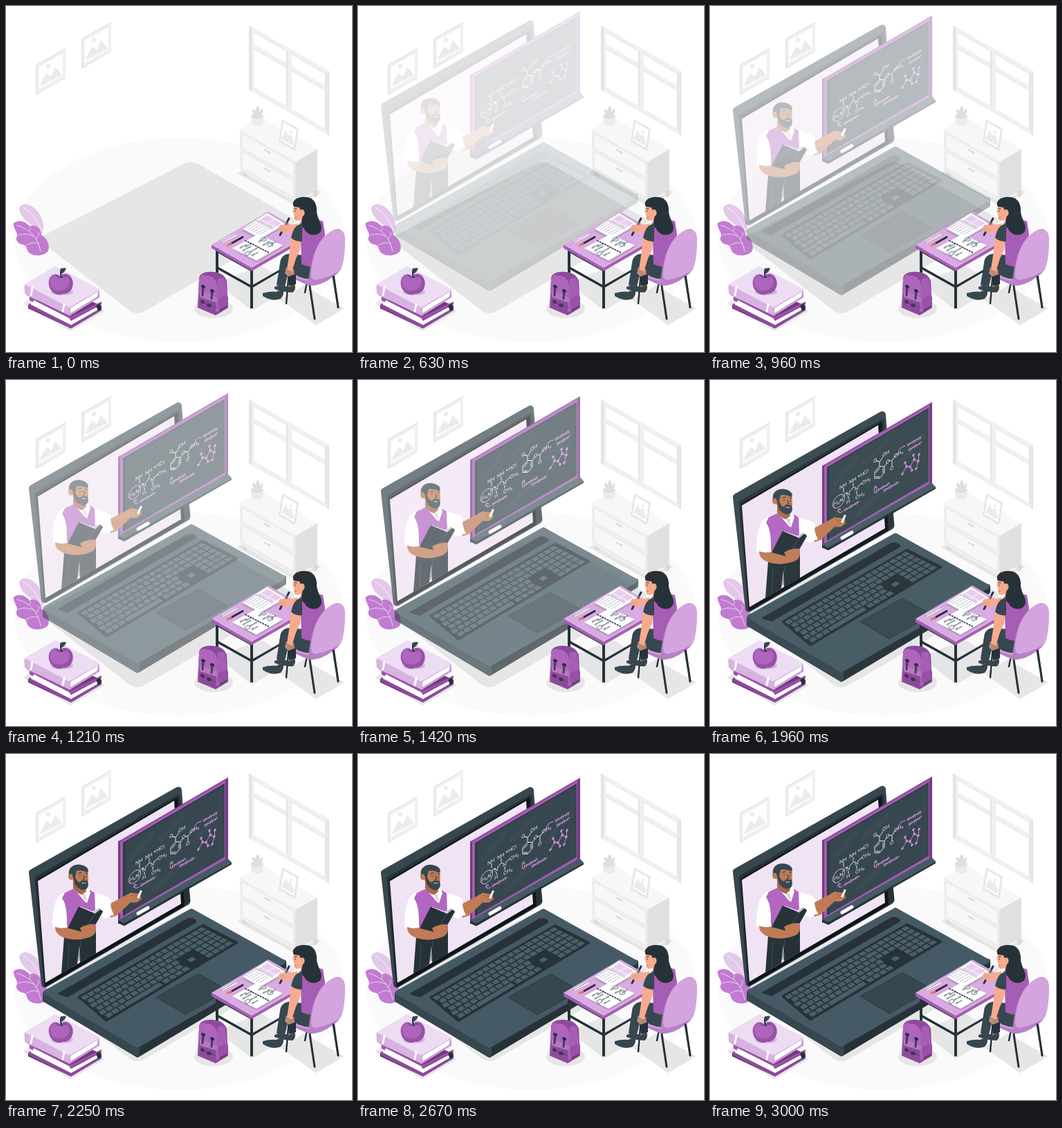
An HTML page for the animation above (3.04 s loop, 500 px wide and 500 px high).

```html
<!DOCTYPE html>
<html lang="en">
<head>
<meta charset="utf-8">
<title>Online lesson</title>
<style>
html, body { margin: 0; width: 100%; height: 100%; overflow: hidden; background: #fff; }
svg { display: block; width: 100vw; height: 100vh; }
text { font: 7px Inter, Arial, sans-serif; fill: #f5f5f5; }
.line { fill: none; stroke-linecap: round; stroke-linejoin: round; }
</style>
</head>
<body>
<svg viewBox="0 0 500 500">
<defs>
  <g id="picture">
    <path fill="#e6e6e6" d="M0 0L43-24V19L0 44Z"/>
    <path fill="#f0f0f0" d="M2 1L43-22V18L2 41Z"/>
    <path fill="#fff" d="M5 3L39-16V15L5 35Z"/>
    <path fill="#ebebeb" d="M7 31V27L15 12L19 14L22 17L28 3L37 13V15Z"/>
    <circle cx="18" cy="2" r="3" fill="#ebebeb"/>
  </g>
</defs>

<!-- Room -->
<ellipse cx="251" cy="338" rx="239" ry="147.500" fill="#fafafa"/>
<use href="#picture" x="43" y="85"/>
<use href="#picture" x="109" y="47"/>
<path fill="#f0f0f0" fill-rule="evenodd" d="M351 28L467 94V187L351 121ZM358 38V55L405 82V65ZM413 70V87L461 115V98ZM358 62V117L405 144V89ZM413 94V149L461 177V122Z"/>
<path fill="#e3e3e3" d="M351 28L355 30V123L351 121ZM405 65L407 66V145L405 144ZM461 98L463 97V179L461 178ZM464 96L467 94V187L464 185Z"/>
<path class="line" stroke="#e6e6e6" d="M358 38L405 65M413 70L461 98M358 62L405 89M413 94L461 122"/>
<path fill="#e6e6e6" d="M334 242L340 238L420 284L451 267L455 270L421 290Z"/>
<path fill="#d8d8d8" d="M341 238L348 242V246H344ZM443 268L450 264V274L446 277Z"/>
<path fill="#f0f0f0" d="M338 178L418 224V283L338 237Z"/>
<path fill="#e0e0e0" d="M418 224L450 207V266L418 283Z"/>
<path fill="#f7f7f7" d="M338 178L368 160L450 207L419 225Z"/>
<path fill="#f7f7f7" stroke="#e3e3e3" d="M341 184L416 227V248L341 205ZM341 210L416 253V277L341 234Z"/>
<path class="line" stroke="#dadada" stroke-width="2.500" d="M374 208L381 212M374 235L381 239"/>
<path fill="#dcdcdc" d="M362 159C355 154 355 150 357 149Q362 151 363 158Q359 148 364 144Q368 150 365 158Q367 149 371 149Q373 153 366 160Z"/>
<path fill="#ebebeb" d="M354 159H372L371 170Q363 176 355 170Z"/>
<ellipse cx="363" cy="159" rx="9" ry="4" fill="#dedede"/>
<path fill="#e6e6e6" d="M399 164L423 177L418 210L394 196Z"/>
<path fill="#fff" d="M401 168L420 179L416 205L397 194Z"/>
<path fill="#ebebeb" d="M398 192L404 179L408 188L411 184L416 196L415 202Z"/>
<circle cx="412" cy="182" r="2" fill="#ebebeb"/>

<path fill="#e6e6e6" d="M54 332Q46 337 54 343L178 440Q190 448 202 440L412 318Q422 311 410 304L279 229Q267 222 255 229Z"/>
<path fill="#e6e6e6" d="M24 430L70 405L143 441L93 470ZM305 400L355 440L418 405L368 375ZM396 424L448 461L489 437L430 404Z"/>
<ellipse cx="300" cy="437" rx="28" ry="14" fill="#e6e6e6"/>

<!-- Plant -->
<path fill="#e3c8ea" d="M19 293C22 284 33 285 42 293C53 303 57 320 52 329C43 317 23 313 19 293Z"/>
<path class="line" stroke="#fff" stroke-width=".8" d="M25 291Q42 301 52 326"/>
<path fill="#c17bd0" d="M11 314C18 308 27 311 34 318C43 315 51 321 51 331C59 335 64 345 61 354C55 361 42 363 34 357C29 353 31 348 26 345C19 345 12 338 16 333C18 328 10 321 11 314Z"/>
<path class="line" stroke="#ead5ef" stroke-width="1" d="M16 317Q45 325 50 355M34 325Q37 321 34 318M43 336Q49 333 47 327M18 331Q30 327 41 333M29 346Q38 340 47 343"/>

<!-- Sliding laptop, teacher and board -->
<g id="lesson">
  <path fill="#37474f" stroke="#37474f" stroke-width="10" stroke-linejoin="round" d="M38 170L249 51L261 212L56 331Z"/>
  <path fill="#263238" stroke="#263238" stroke-width="5" stroke-linejoin="round" d="M44 178L249 60L264 211L57 333Z"/>
  <path fill="#0e1417" d="M45 180L248 61L258 218L56 335Z"/>
  <path fill="#f0e3f4" d="M46 182L243 66L253 215L57 329Z"/>

  <path fill="#263238" stroke="#263238" stroke-width="6" stroke-linejoin="round" d="M56 345L190 422L402 299V307L190 434L56 354Z"/>
  <path fill="#37474f" stroke="#37474f" stroke-width="6" stroke-linejoin="round" d="M56 345L190 422V433L56 354Z"/>
  <path fill="#455a64" stroke="#455a64" stroke-width="6" stroke-linejoin="round" d="M57 343L268 225L401 299L190 420Z"/>
  <path fill="#263238" d="M74 345L262 236Q270 234 275 239V242L89 350Z"/>
  <path fill="#263238" stroke="#263238" stroke-width="3" stroke-linejoin="round" d="M105 350L285 246L334 271L145 384Z"/>
  <g id="keys" fill="#4a5f69"></g>
  <path fill="#37474f" stroke="#2c3a41" d="M217 350L278 316L321 340L259 375Z"/>

  <!-- Teacher -->
  <path fill="#263238" d="M84 263L130 248V287L107 300L106 276L103 302L80 316Z"/>
  <path class="line" stroke="#455a64" stroke-width=".8" d="M91 272L89 308M108 269L105 297"/>
  <path fill="#fff" d="M86 198C73 202 68 213 67 249L86 252L92 235L126 227L144 236L158 229L151 210Q140 204 126 197L110 191Z"/>
  <path fill="#b266c2" d="M85 199L98 193L115 213L121 195L128 199L130 252Q108 267 87 265L88 240Q88 216 81 207Z"/>
  <path fill="#fff" d="M97 192L103 188L119 193L122 199L117 214Z"/>
  <path fill="#d7d2da" d="M110 202L115 201L117 212L113 208Z"/>
  <path fill="#a96744" d="M97 181L114 187L116 197L110 202Q102 200 97 192Z"/>
  <path fill="#bf7b55" d="M95 166Q104 158 118 164L119 181Q117 193 109 192Q99 190 96 180Z"/>
  <ellipse cx="94" cy="175" rx="4" ry="5.500" fill="#bf7b55"/>
  <path fill="#37474f" d="M91 173C89 161 101 155 113 160Q121 164 118 170Q109 166 102 167L100 176Q102 183 107 184Q109 179 118 182L119 187Q118 196 110 195Q99 191 98 181L96 173Q93 170 91 173Z"/>
  <path class="line" stroke="#263238" stroke-width="1" d="M105 171L109 170M115 171L118 172M107 174V175M116 175V176M112 174L114 179L111 180"/>
  <path class="line" stroke="#f0d1bf" stroke-width="1" d="M110 185L115 185"/>
  <path fill="#bf7b55" d="M71 246Q70 258 82 263Q100 270 118 264Q130 261 130 252L124 246L107 250L86 247Z"/>
  <path fill="#fff" d="M67 245Q67 228 75 220L86 238L89 249Q80 252 67 247Z"/>
  <path fill="#e9e4ed" d="M90 249L107 219L126 226L146 214L128 246L113 255Z"/>
  <path fill="#263238" d="M89 250L105 219L129 229L112 256ZM129 229L147 214L130 244L112 256Z"/>
  <path class="line" stroke="#54666f" stroke-width=".8" d="M129 229L112 256M129 227L144 215"/>
  <path fill="#bf7b55" d="M107 250Q114 245 127 244L130 250Q127 259 113 264Z"/>

  <!-- Blackboard -->
  <g transform="matrix(1 -.582 0 1 162 125)">
    <path fill="#8b4599" d="M0 0H159V119H0Z"/>
    <path fill="#a45bb3" d="M2 2H157V117H2Z"/>
    <path fill="#743b80" d="M0 0H3V119H0ZM155 2H159V119H155Z"/>
    <path fill="#37474f" d="M7 6H154V112H7Z"/>
    <path fill="#2d3b42" d="M7 6H10V112H7ZM10 6H154V8H10Z"/>
    <path class="line" stroke="#445158" stroke-width="9" opacity=".45" d="M20 35L48 18M61 30L94 20M53 100L92 86M112 63L145 43"/>
    <g id="formulas"></g>
    <g class="line" stroke="#f5f5f5" stroke-width=".9">
      <path d="M30 62L34 59L37 60M31 56V50M40 60L45 57L47 58M45 55V51M52 60L57 58M38 66V70M50 65V70"/>
      <path d="M76 53L83 49L90 53V62L83 66L76 62ZM78 55L83 52M88 55V61M83 64L78 61M83 49V42L78 38M84 42L88 38M90 53L94 50M97 49L101 51L106 47M101 52V58"/>
    </g>
    <g class="line" stroke="#ce93d8" stroke-width="1">
      <circle cx="24" cy="65" r="8.500" stroke="#d9a5e3"/>
      <path d="M30 83Q23 84 24 76M22 79L24 76L27 79M79 84Q72 83 78 74M75 76L78 74L79 78M120 41Q111 37 109 48M107 45L109 48L112 46"/>
      <path d="M116 79L122 72L127 75L133 68L139 74M122 72L120 65M133 68L132 61M127 75L130 82M139 74L140 65M139 74L136 83"/>
      <g id="notes"></g>
    </g>
    <g id="atoms" fill="#ce93d8"></g>
  </g>
  <path fill="#455a64" d="M162 239L320 149L326 155L171 244Z"/>
  <path fill="#263238" d="M162 239L171 243L326 155V158L171 247L162 243Z"/>
  <path class="line" stroke="#fff" stroke-width="5" d="M191 229L205 221"/>
  <path class="line" stroke="#d8cfdc" stroke-width="1" d="M190 232L206 223"/>

  <!-- Pointing arm -->
  <path fill="#bf7b55" d="M150 215L171 204L180 199L188 200L194 201L196 208L189 213L180 213L160 232L151 235Z"/>
  <path class="line" stroke="#9d603e" stroke-width=".8" d="M187 203L195 205M186 207L194 208M182 203L188 205"/>
  <path class="line" stroke="#fff" stroke-width="3" d="M191 206L195 197"/>
  <path fill="#fff" d="M130 201Q145 202 152 209Q149 218 156 231Q150 234 143 228L130 218Z"/>
</g>

<!-- Desk -->
<g fill="#263238">
  <path d="M303 350H307V398H303ZM353 379H357V437H353ZM410 350H413V404H410Z"/>
  <path d="M305 376L355 404V408L305 380ZM355 404L411 372V375L355 408ZM305 351L355 380V384L305 356Z"/>
</g>
<path fill="#a65db5" d="M297 345L355 378L430 335V340L355 383L297 350Z"/>
<path fill="#d9abe3" d="M297 345L379 297L437 330L355 378Z"/>
<path fill="#b99ac2" d="M341 325L368 339L406 317V315L376 298Z"/>
<path fill="#fff" d="M342 322L377 299L404 315L368 336Z"/>
<path fill="#e7cfec" d="M363 311L378 302L398 314L384 322Z"/>
<path class="line" stroke="#fff" stroke-width="1" d="M368 308L389 319M374 316L389 308"/>
<path class="line" stroke="#a9a9a9" stroke-width=".7" d="M347 321L363 311M350 323L367 313M353 325L370 315M357 327L374 317M361 329L377 320M365 331L380 322M360 309L386 323"/>
<path fill="#b99ac2" d="M327 352L362 371L400 349V346L362 366Z"/>
<path fill="#fff" d="M327 350L364 330L400 346L362 368Z"/>
<path class="line" stroke="#37474f" stroke-width="1.800" stroke-dasharray="1.500 2.500" d="M346 339L381 357"/>
<g id="homework" class="line" stroke="#455a64" stroke-width=".7"></g>
<path class="line" stroke="#455a64" stroke-width=".8" d="M368 336L373 334L377 338L372 340ZM378 344L384 341L386 346L380 348ZM345 357L350 354L353 358L348 361Z"/>
<path class="line" stroke="#fff" stroke-width="3.500" d="M313 340L332 330"/>
<path class="line" stroke="#777" stroke-width="1" d="M311 341L333 329"/>
<path class="line" stroke="#263238" stroke-width="3" d="M324 344L342 334"/>
<path class="line" stroke="#e47763" stroke-width="3" d="M320 346L325 343"/>

<!-- Student and chair -->
<g class="line" stroke="#263238" stroke-width="2.500">
  <path d="M409 384L405 430M435 399L432 414M473 386L480 436"/>
</g>
<path fill="#b980c6" d="M407 380Q405 387 415 394L437 404Q453 406 473 391L465 375Z"/>
<path fill="#d4a4de" d="M407 379Q413 371 430 369L465 375L445 400L414 391Z"/>
<path fill="#f6ab8e" d="M412 397L418 396L417 408L409 409ZM393 404L402 405L400 414L390 416Z"/>
<path fill="#37474f" d="M388 406Q395 402 409 406L417 402Q420 410 414 414Q403 414 388 409ZM371 415Q381 412 391 413L400 409Q403 417 397 423Q385 428 371 419Z"/>
<path fill="#263238" d="M406 372L419 380L419 402L409 405Z"/>
<path fill="#37474f" d="M448 374L429 360L408 358Q397 360 396 371L391 403Q397 408 403 405L409 382Q426 397 445 394Z"/>
<path fill="#f6ab8e" d="M421 314L407 318L397 316Q391 320 396 324L401 328L421 325Z"/>
<path class="line" stroke="#263238" stroke-width="2.800" d="M409 307L396 331"/>
<path class="line" stroke="#d8d8d8" stroke-width="1" d="M406 312L403 317"/>
<path fill="#f6ab8e" d="M396 317L405 316L408 322L402 328L395 324Z"/>
<path class="line" stroke="#e58f72" stroke-width=".8" d="M397 320L404 321M397 323L403 324"/>
<path fill="#a65db5" d="M425 313Q446 306 458 311L461 330L452 376Q439 379 427 373L426 337L420 329Z"/>
<path fill="#f6ab8e" d="M412 334L427 336L425 352L419 365L413 384L406 380L409 361Z"/>
<path fill="#f6ab8e" d="M405 378L416 380L417 388L408 391L403 386Z" opacity=".7"/>
<path fill="#37474f" d="M428 315Q416 315 412 335Q418 341 428 340Z"/>
<path fill="#f6ab8e" d="M420 286L416 290L414 296L416 300L417 309Q421 312 426 309L427 317L435 316L437 294Z"/>
<path fill="#263238" d="M416 290C412 283 418 276 431 276C445 275 450 287 449 298C451 311 460 318 454 327C447 334 435 331 431 322C424 317 428 309 429 303L424 291Z"/>
<ellipse cx="428" cy="299" rx="3.500" ry="5" fill="#f6ab8e"/>
<path class="line" stroke="#263238" stroke-width="1" d="M417 293H420M418 296V297"/>
<path class="line" stroke="#d06c61" stroke-width="1" d="M417 306L420 305"/>
<path fill="#b980c6" d="M437 404C439 371 447 338 471 325Q482 319 488 328Q491 340 488 362Q486 384 473 391Q455 405 437 404Z"/>
<path fill="#d4a4de" d="M441 384C444 352 455 332 474 324Q490 321 490 337Q490 366 484 381C472 389 459 394 446 396Q440 394 441 384Z"/>
<path class="line" stroke="#263238" stroke-width="3" d="M439 405L446 452M473 391L480 435"/>

<!-- Backpack -->
<path fill="#8d4a9b" d="M279 393Q281 384 296 384Q314 384 319 397L321 436L303 447L277 436Z"/>
<path fill="#ad65bd" d="M279 397C278 384 302 384 305 401L306 442L277 433Z"/>
<path fill="#a65db5" d="M304 397Q309 391 316 394L319 411L320 433L306 442Z"/>
<path fill="#713b7c" d="M308 424L320 419V435L309 442Z"/>
<path fill="#9851a7" d="M309 422L319 418L321 421V432L309 438Z"/>
<path fill="#8d4a9b" d="M279 415Q292 416 304 424L303 443L278 433Z"/>
<path fill="#b875c6" d="M280 413Q292 414 305 422V429L280 421Z"/>
<path class="line" stroke="#37474f" stroke-width="3" d="M285 405L284 418M298 411L297 423"/>
<path class="line" stroke="#263238" stroke-width="4" d="M284 405L286 406M297 411L299 412M283 427L285 428M292 432L295 433"/>
<path class="line" stroke="#713b7c" stroke-width="1" d="M287 389Q300 386 306 401M281 426L304 437"/>

<!-- Books and apple -->
<path fill="#713b7c" d="M32 432L76 407L138 433V439L94 466L32 437Z"/>
<path fill="#fff" d="M36 427L92 456L135 433V438L94 462L36 432Z"/>
<path fill="#9851a7" d="M34 420L93 449L138 427V431L94 454Q40 430 34 425Z"/>
<path fill="#8d4a9b" d="M33 430L94 461L138 436V440L94 466L33 435Z"/>
<path fill="#fff" d="M40 425L91 451L95 456L93 459L38 430Z"/>
<path fill="#263238" d="M130 433L136 430L138 438L133 441Z"/>
<path fill="#c995d4" d="M27 402V414Q28 417 32 419L92 448L135 421V412L92 437Z"/>
<path fill="#fff" d="M93 436L133 413L132 420L93 444Z"/>
<path fill="#d8b3e1" d="M27 402L92 434V447L30 417Q25 412 27 402Z"/>
<path fill="#eddcf2" d="M27 402L71 376L135 409V412L92 436Z"/>
<path class="line" stroke="#fff" stroke-width="3" d="M38 407L36 418M84 431L82 441"/>
<path class="line" stroke="#d4b0dd" stroke-width="1" d="M92 436L135 411M92 447L135 421"/>
<ellipse cx="81" cy="413" rx="16" ry="5" fill="#d1b4da"/>
<path fill="#9851a7" d="M78 390C70 383 60 391 62 403C64 414 74 420 82 416C93 417 99 405 96 396C93 386 84 385 78 390Z"/>
<path fill="#ad65bd" d="M76 390C69 386 62 392 64 402C66 410 72 412 78 411C88 411 94 402 91 395C87 389 82 389 76 390Z"/>
<path class="line" stroke="#713b7c" stroke-width="1.200" d="M73 390Q79 395 86 390"/>
<path class="line" stroke="#263238" stroke-width="2" d="M80 392Q78 384 80 380"/>
<path fill="#37474f" d="M79 384Q80 377 87 379Q86 384 79 388Z"/>
</svg>

<script>
const $ = id => document.getElementById(id);
const mix = (a, b, t) => a + (b - a) * t;

// Keyboard: a bilinear grid inside the tray
const tray = [[105, 350], [285, 246], [334, 271], [145, 384]];
const spot = (u, v) => [0, 1].map(k =>
  mix(mix(tray[0][k], tray[1][k], u), mix(tray[3][k], tray[2][k], u), v).toFixed(1)).join(' ');
const key = (u, v, w, h) =>
  `<path d="M${spot(u, v)}L${spot(u + w, v)}L${spot(u + w, v + h)}L${spot(u, v + h)}Z"/>`;
let keys = '';
for (let row = 0; row < 6; row++) {
  const v = .03 + row * .16, shift = row % 2 * .012;
  for (let col = 0; col < 20; col++) {
    const navGap = col > 12 && col < 16 && (row === 3 || row === 5 || row === 4 && col !== 14);
    const inSpace = row === 5 && col > 3 && col < 9;
    if (!navGap && !inSpace) keys += key(.01 + col * .049 + (col < 13 ? shift : 0), v, .041, .125);
  }
}
$('keys').innerHTML = keys + key(.206, .83, .237, .125);

// Handwriting
const label = (x, y, s) => `<text x="${x}" y="${y}">${s}</text>`;
$('formulas').innerHTML = [
  [17, 68, 'H₂N'], [25, 49, 'NH'], [39, 49, 'NH'], [51, 48, '•HCl'], [57, 61, 'CH₃'],
  [35, 65, 'N'], [47, 64, 'N'], [35, 76, 'H'], [48, 77, 'CH₃'],
  [74, 39, 'O'], [87, 38, 'OH'], [92, 51, 'O'], [104, 49, 'CH₃'], [98, 64, 'O']
].map(a => label(...a)).join('');

const scrawl = (x, y, w, slope = 0, size = 2) => {
  let d = '';
  for (let i = 0; i <= w * 4; i++) {
    const s = i / 4, a = s * 5 / size, h = size * (1 + .5 * Math.sin(s * .8));
    d += (i ? 'L' : 'M') + (x + s + Math.sin(a) * size * .4).toFixed(1) +
      ' ' + (y + s * slope - Math.cos(a) * h * .6).toFixed(1);
  }
  return `<path d="${d}"/>`;
};
$('notes').innerHTML = [[32, 83, 21], [78, 82, 19], [89, 88, 21], [123, 42, 20], [125, 50, 18]]
  .map(a => scrawl(...a)).join('');
$('atoms').innerHTML = [[116, 79], [122, 72], [127, 75], [133, 68], [139, 74], [120, 65], [132, 61],
  [130, 82], [140, 65], [136, 83]].map(([x, y]) => `<circle cx="${x}" cy="${y}" r="1.8"/>`).join('');
$('homework').innerHTML = [[338, 350, 9], [342, 354, 12], [352, 356, 11], [355, 361, 9], [365, 341, 9],
  [371, 346, 10], [382, 345, 8], [346, 348, 9]].map(([x, y, w]) => scrawl(x, y, w, -.55, 1.3)).join('');

// Slide down with a slight overshoot: cubic-bezier(.36, -.01, .5, 1.38)
const bez = (a, b, s) => 3 * a * s * (1 - s) ** 2 + 3 * b * s * s * (1 - s) + s ** 3;
function ease(x) {
  let lo = 0, hi = 1;
  for (let i = 0; i < 24; i++) {
    const mid = (lo + hi) / 2;
    if (bez(.36, .5, mid) < x) lo = mid; else hi = mid;
  }
  return bez(-.01, 1.38, lo);
}

const LOOP = 3040, SLIDE = 3000, DROP = 30;
const lesson = $('lesson');
function draw() {
  const p = ease(Math.min(1, performance.now() % LOOP / SLIDE));
  lesson.setAttribute('opacity', Math.max(0, Math.min(1, p)));
  lesson.setAttribute('transform', `translate(0 ${DROP * (p - 1)})`);
  requestAnimationFrame(draw);
}
draw();
</script>
</body>
</html>
```
